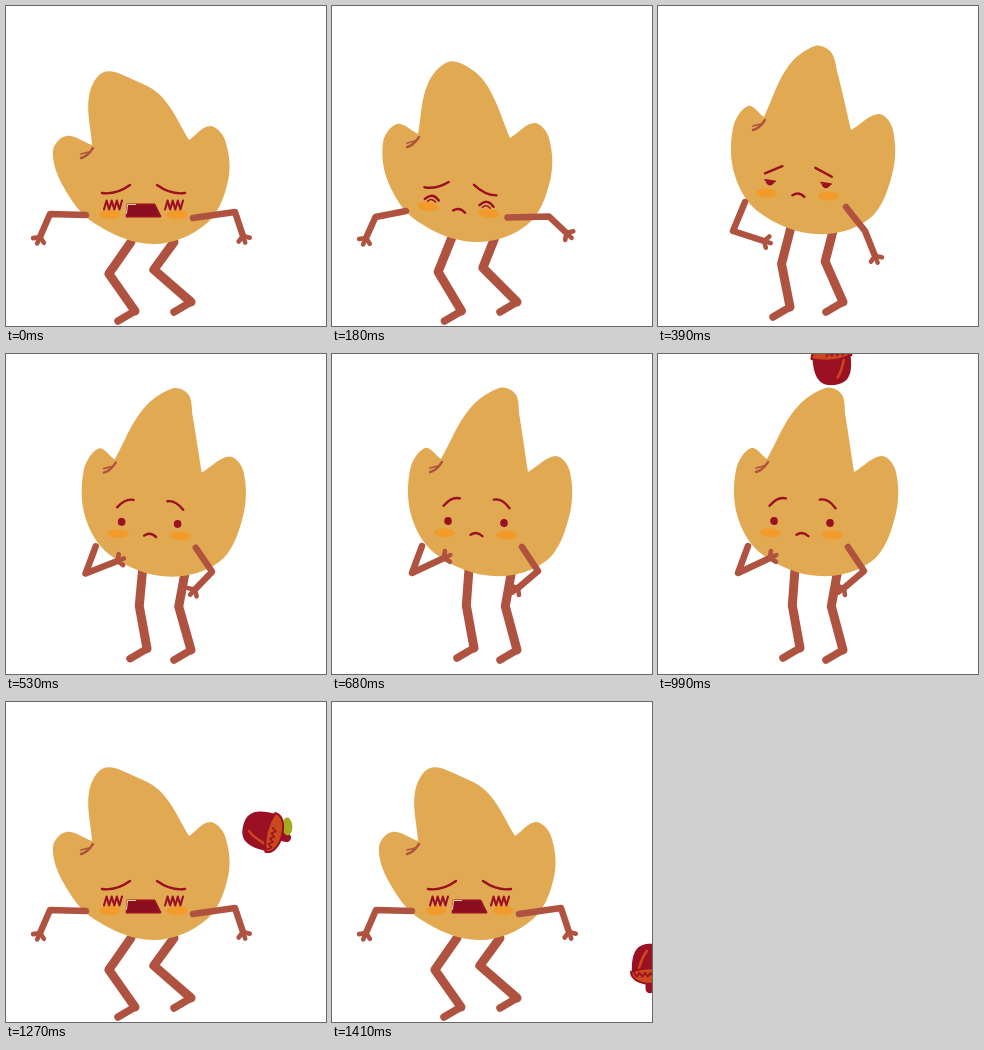
Write an HTML page with a canvas that moves like this. It is 320x320 px and loops after 1.48 s.

```html
<!DOCTYPE html>
<html lang="en">
<head>
<meta charset="utf-8">
<title>Acorn bump</title>
<style>
  html, body { margin: 0; width: 100%; height: 100%; overflow: hidden; background: #fff; }
  canvas { display: block; width: 320px; height: 320px; }
</style>
</head>
<body>
<canvas id="stage" width="320" height="320"></canvas>
<script>
const ctx = document.getElementById('stage').getContext('2d');
const LOOP = 1480, STEP = 70, WAKE = 180, SETTLE = 530, THINK = 680, DROP = 990;
const SKIN = '#e2a953', LIMB = '#af5340', RED = '#9b1022', CHEEK = '#f29b2b';
const RUST = '#cb4a1d', LEAF = '#a4ab1d', GREY = '#85817f';

// Key points of the two body shapes, both running from notch to notch.
const squashed = {
  tip: [86,139, 83,90, 98,66, 128,74, 156,91, 183,134],
  rim: [183,134, 204,120, 219,134, 222,175, 200,218, 147,238, 88,217, 57,180, 47,145, 60,130, 86,139]
};
const upright = {
  tip: [86,117, 108,67, 134,46, 150,52, 158,74, 173,130],
  rim: [173,130, 201,114, 215,130, 214,175, 191,219, 138,234, 82,213, 57,176, 55,128, 70,106, 86,117]
};

const dazed = {
  body: squashed, shift: [0, 0], lean: 0,
  hips: [146, 236], bend: 24, foot: [129, 305],
  arms: [[80,209, 44,208, 34,231], [187,212, 229,206, 237,230]],
  face: { x: 137.5, y: 199, tilt: 0, half: 30.5, drop: 9.5, brow: 28, lift: 12, bow: 3, look: 'dazed' }
};
const bumped = {
  ...dazed, shift: [0, 4], hips: [144, 240], bend: 27,
  arms: [[80,213, 46,203, 34,225], [186,216, 225,204, 244,221]],
  face: { ...dazed.face, y: 203 }
};
const wince = {
  body: upright, shift: [0, 0], lean: 0,
  hips: [135, 229], bend: 12, foot: [130, 305],
  arms: [[68,201, 43,214, 34,233], [164,211, 205,215, 232,224]],
  face: { x: 117, y: 192.5, tilt: .226, half: 24.5, drop: 7, brow: 19, lift: 9, bow: 2, look: 'shut' }
};
const weary = {
  body: upright, shift: [20, -6], lean: 3,
  hips: [154, 221], bend: 9, foot: [132, 301],
  arms: [[87,196, 75,225, 106,235], [188,201, 207,225, 217,250]],
  face: { x: 140, y: 177.5, tilt: .05, half: 28, drop: 11, brow: 17, lift: 8.5, bow: 0, look: 'half' }
};
const wonder = {
  body: upright, shift: [23, -12], lean: 11,
  hips: [158, 215], bend: 5, foot: [142, 294],
  arms: [[90,192, 80,219, 112,204], [190,193, 206,217, 186,234]],
  face: { x: 144, y: 168, tilt: .036, half: 28, drop: 12, brow: 16, lift: 15, bow: -3, look: 'open' }
};

const keys = [
  [0, dazed], [110, dazed], [250, wince], [390, weary], [545, wonder],
  [DROP, wonder], [1060, bumped], [1130, bumped], [1270, dazed], [LOOP, dazed]
];

function blend(a, b, t) {
  if (typeof a === 'number') return a + (b - a) * t;
  if (typeof a === 'string') return t < .5 ? a : b;
  if (Array.isArray(a)) return a.map((v, i) => blend(v, b[i], t));
  return Object.fromEntries(Object.keys(a).map(k => [k, blend(a[k], b[k], t)]));
}

function poseAt(time) {
  const i = keys.findIndex(k => k[0] > time);
  const [[start, from], [end, to]] = [keys[i - 1], keys[i]];
  return blend(from, to, (time - start) / (end - start));
}

// The drawing moves on fixed exposures with three long holds.
function heldTime(t) {
  const snap = origin => origin + STEP * Math.floor((t - origin) / STEP);
  if (t < WAKE) return 0;
  if (t < SETTLE) return snap(WAKE);
  if (t < THINK) return SETTLE;
  return t < DROP ? THINK : snap(DROP);
}

function stroke(color, width) {
  ctx.strokeStyle = color;
  ctx.lineWidth = width;
  ctx.stroke();
}

function fill(color) {
  ctx.fillStyle = color;
  ctx.fill();
}

function polyline(p, color, width) {
  ctx.beginPath();
  for (let i = 0; i < p.length; i += 2) ctx.lineTo(p[i], p[i + 1]);
  stroke(color, width);
}

// Arc between two points that rises or sinks by bow at its middle.
function arc(x0, y0, x1, y1, bow, color, width) {
  ctx.beginPath();
  ctx.moveTo(x0, y0);
  ctx.quadraticCurveTo((x0 + x1) / 2, (y0 + y1) / 2 + 2 * bow, x1, y1);
  stroke(color, width);
}

function oval(x, y, rx, ry, angle, color) {
  ctx.beginPath();
  ctx.ellipse(x, y, rx, ry, angle, 0, Math.PI * 2);
  fill(color);
}

function zigzag(x, y, w, h, turns, color, width) {
  const p = [];
  for (let i = 0; i <= turns; i++) p.push(x - w / 2 + w * i / turns, y + (i % 2 ? -h : h) / 2);
  polyline(p, color, width);
}

// Smooth curve with handles scaled to the length of each span.
function spline(flat) {
  const n = flat.length / 2;
  const p = i => { const k = 2 * Math.max(0, Math.min(n - 1, i)); return [flat[k], flat[k + 1]]; };
  const span = i => Math.hypot(p(i + 1)[0] - p(i)[0], p(i + 1)[1] - p(i)[1]);
  const slope = i => [0, 1].map(k => (p(i + 1)[k] - p(i - 1)[k]) / (span(i - 1) + span(i)));
  ctx.lineTo(...p(0));
  for (let i = 0; i < n - 1; i++) {
    const [a, b, reach] = [p(i), p(i + 1), span(i) * .36];
    const [u, v] = [slope(i), slope(i + 1)];
    ctx.bezierCurveTo(a[0] + u[0] * reach, a[1] + u[1] * reach,
      b[0] - v[0] * reach, b[1] - v[1] * reach, ...b);
  }
}

function drawLeg(hx, hy, ax, ay, bend) {
  const knee = [hx + (ax - hx) * .46 - bend, hy + (ay - hy) * .46];
  polyline([hx, hy, ...knee, ax, ay], LIMB, 9);
  polyline([ax, ay, ax - 17, ay + 10], LIMB, 7.5);
}

function drawArm(p) {
  polyline(p, LIMB, 6.5);
  const [ex, ey, hx, hy] = p.slice(2);
  const dir = Math.atan2(hy - ey, hx - ex);
  for (const turn of [-1, 0, 1]) {
    polyline([hx, hy, hx + 7 * Math.cos(dir + turn), hy + 7 * Math.sin(dir + turn)], LIMB, 4.6);
  }
}

function drawBody({ body, shift: [dx, dy], lean }) {
  const place = (p, bend) => p.map((v, i) =>
    i % 2 ? v + dy : v + dx + bend * Math.sin(Math.PI * i / (p.length - 2)));
  const tip = place(body.tip, lean);
  ctx.beginPath();
  spline(tip);
  spline(place(body.rim, 0));
  ctx.closePath();
  fill(SKIN);
  const [x, y] = tip;
  arc(x - 11, y + 13, x + 1, y + 3, 2, LIMB, 2.4);
  polyline([x - 11, y + 9, x - 3, y + 7], LIMB, 1.8);
}

function drawEye(x, look) {
  if (look === 'dazed') zigzag(x, 0, 18, 9, 7, RED, 2.1);
  if (look === 'shut') {
    arc(x - 7, 1, x + 7, 1, -4, RED, 2.5);
    arc(x - 4, 3, x + 4, 3, -2, RED, 1.5);
  }
  if (look === 'half') {
    ctx.beginPath();
    ctx.arc(x, -1, 4.3, 0, Math.PI);
    fill(RED);
    polyline([x - 5, -2, x + 5, -1], RED, 1.8);
  }
  if (look === 'open') oval(x, 0, 3.8, 4, 0, RED);
}

function drawMouth(y, look) {
  if (look !== 'dazed') return arc(-5, y + 1, 7, y + 2, -2.5, RED, 2.4);
  ctx.beginPath();
  ctx.moveTo(-17, y + 2);
  ctx.lineTo(-16, y - 10);
  ctx.lineTo(11, y - 10);
  ctx.lineTo(17, y + 2);
  ctx.closePath();
  fill('#8a0e20');
  stroke(RED, 1.8);
  polyline([-17, y - 1, -16, y - 10, -8, y - 10], '#f6dcc0', 1);
}

function drawFace({ x, y, tilt, half, drop, brow, lift, bow, look }) {
  ctx.save();
  ctx.translate(x, y);
  ctx.rotate(tilt);
  for (const side of [-1, 1]) {
    oval(side * (half + 3), drop, 10.5, 4.5, 0, CHEEK);
    const outer = half + brow / 2 - 3;
    arc(side * outer, -lift, side * (outer - brow), -lift - 8, bow, RED, 2.4);
    drawEye(side * half, look);
  }
  drawMouth(drop, look);
  ctx.restore();
}

function drawCharacter(pose) {
  const [hx, hy] = pose.hips;
  drawLeg(hx - 21, hy, ...pose.foot, pose.bend);
  drawLeg(hx + 22, hy, 185, 296, pose.bend + 4);
  drawBody(pose);
  drawFace(pose.face);
  pose.arms.forEach(drawArm);
}

function drawAcorn(x, y, angle) {
  ctx.save();
  ctx.translate(x, y);
  ctx.rotate(angle);
  polyline([1, -15, 1, -22], RED, 9);
  oval(-10, -20, 9, 5, -.3, LEAF);
  ctx.beginPath();
  ctx.moveTo(-19, -8);
  ctx.bezierCurveTo(-20, 14, -15, 23, 0, 23);
  ctx.bezierCurveTo(15, 23, 20, 14, 19, -8);
  ctx.closePath();
  fill(RED);
  arc(12, -1, 4, 16, 2, RUST, 2.5);
  ctx.beginPath();
  ctx.moveTo(-20, -5);
  ctx.bezierCurveTo(-20, -21, 20, -21, 20, -5);
  ctx.quadraticCurveTo(0, 2, -20, -5);
  fill(RUST);
  stroke(RED, 2);
  zigzag(6, -8, 22, 4, 8, RED, 1.6);
  ctx.restore();
}

// Falls onto the head, then bounces off to the right under gravity.
function acornAt(n) {
  if (n < 1) return [174, 8, -.1];
  const k = n - 2;
  return [200 + 29.75 * k, 78 + 4.5 * k + 10.55 * k * k, .5 + .66 * k];
}

function drawShake() {
  for (const [x, y] of [[135, 77], [94, 123], [212, 132], [58, 200], [223, 198]]) {
    zigzag(x, y, 6, 23, 5, GREY, 1.5);
  }
  for (const [x, y] of [[172, 86], [180, 101], [196, 103]]) {
    arc(x, y, 169 + (x - 172) / 4, 109, 1.5, GREY, 2.2);
  }
}

function render(now) {
  const time = heldTime(now % LOOP);
  const beat = (time - DROP) / STEP;
  ctx.fillStyle = '#fff';
  ctx.fillRect(0, 0, 320, 320);
  ctx.lineCap = ctx.lineJoin = 'round';
  drawCharacter(poseAt(time));
  if (beat >= 1 && beat <= 3) drawShake();
  if (beat >= 0) drawAcorn(...acornAt(beat));
}

const start = performance.now();
function tick() {
  render(performance.now() - start);
  requestAnimationFrame(tick);
}
tick();
</script>
</body>
</html>
```
